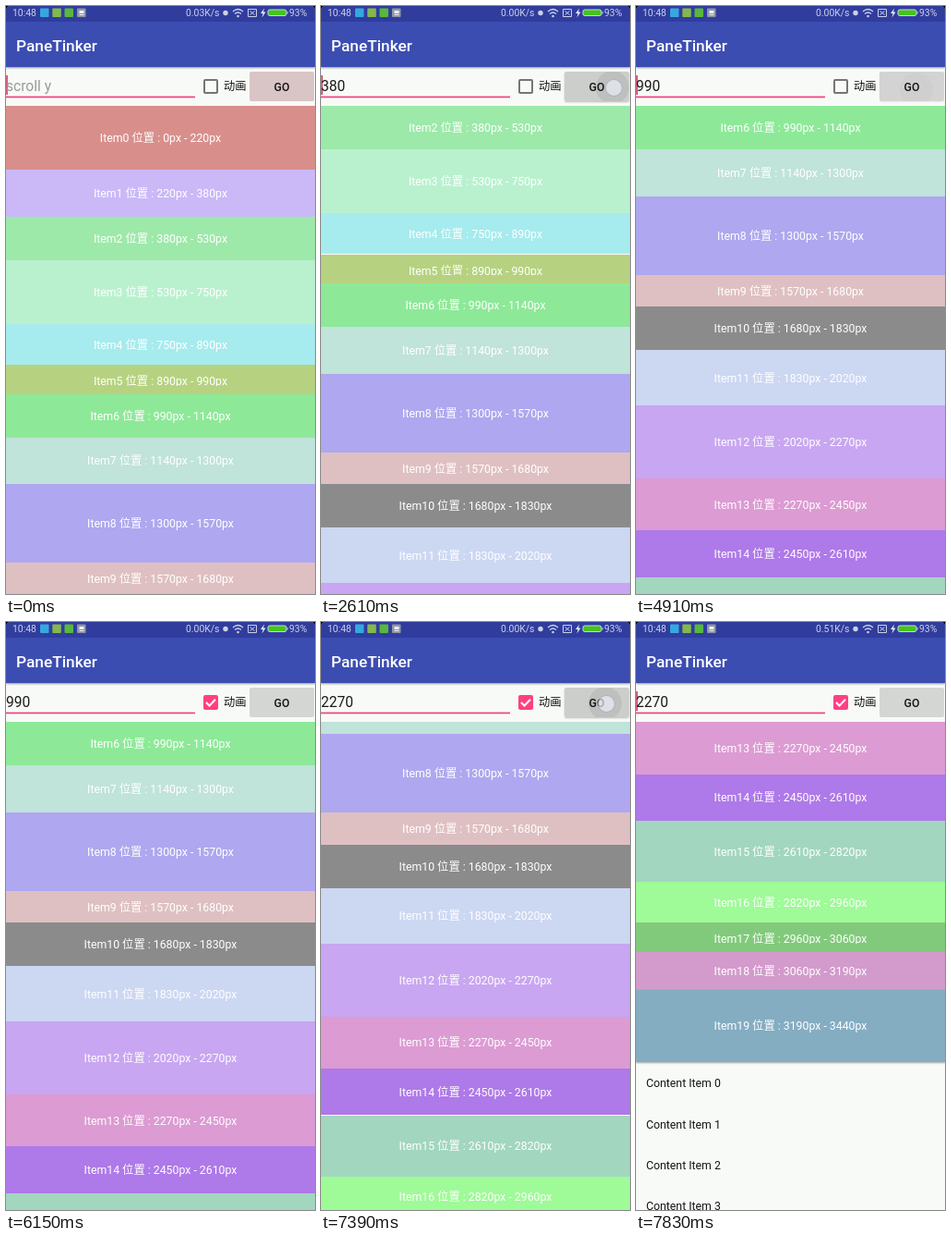
Write an HTML page that moves like this. It is 335 px wide and 636 px high and loops after 8 s.

```html
<!DOCTYPE html>
<html lang="zh">
<head>
<meta charset="utf-8">
<title>PaneTinker</title>
<style>
  html, body { margin: 0; width: 100%; height: 100%; overflow: hidden; background: #000; }
  body { position: relative; color: #151515;
    font: 12.3px/16px Roboto, "Noto Sans CJK SC", "Noto Sans CJK", sans-serif; }
  div, svg { position: absolute; }
  .t { white-space: pre; }
  #page { left: 0; top: 0; width: 335px; height: 636px; overflow: hidden;
    background: #f8faf7; border-radius: 5px 5px 0 0; }
  #list { left: 0; top: 108px; width: 335px; height: 528px; overflow: hidden; }
  #track { left: 0; top: 0; width: 335px; }
  .item { left: 0; width: 335px; }
  .label { left: 0; right: 0; top: 10px; bottom: 9px; overflow: hidden; color: #fff;
    display: flex; align-items: safe center; justify-content: center; }
  #bar { left: 0; top: 0; width: 335px; height: 66px; background: #3c4db2;
    box-shadow: 0 1px 2px rgba(0, 0, 0, .4); }
  #status { left: 0; top: 0; width: 335px; height: 17px; background: #303d9d;
    color: #ccd1ea; font-size: 10.4px; }
  #title { left: 11px; top: 31px; font: 500 17.3px/24px Roboto, sans-serif; color: #fff; }
  #field { left: 0; top: 77px; font-size: 15.6px; line-height: 20px; }
  #line { left: 0; top: 96px; }
  #caret { left: 0; top: 75px; width: 2px; height: 21px; background: #d8607f; }
  #button { left: 264px; top: 71px; width: 70px; height: 32px; border-radius: 2px; overflow: hidden; }
  #go { left: 0; width: 70px; top: 9px; text-align: center; font-weight: 500; }
  #lift { left: 264px; top: 71px; width: 70px; height: 32px; border-radius: 2px;
    box-shadow: 0 1px 2px rgba(0, 0, 0, .25); }
  #box { left: 214px; top: 79px; width: 12px; height: 12px; border: 2px solid #757575; border-radius: 2px; }
  .ripple { width: 36px; height: 36px; margin: -18px; border-radius: 50%; background: #000; }
  #dot { width: 17px; height: 17px; margin: -9.5px; border-radius: 50%;
    background: rgba(236, 239, 246, .68); border: 1px solid rgba(150, 156, 178, .65); }
</style>
</head>
<body>
<div id="page">
  <div id="list"><div id="track"></div></div>
  <div id="bar">
    <div id="status">
      <div class="t" style="left:7px;top:0">10:48</div>
      <svg width="335" height="17" style="left:0;top:0" fill="none" stroke="#ccd1ea">
        <g stroke="none">
          <rect x="37" y="2.5" width="9.5" height="9.5" rx="1" fill="#35a8e0"/>
          <rect x="50.3" y="2.5" width="9.5" height="9.5" rx="1" fill="#84b84c"/>
          <rect x="63.5" y="2.5" width="9.5" height="9.5" rx="1" fill="#58b83c"/>
          <rect x="77" y="2.5" width="9.5" height="9.5" rx="1" fill="#9097a6"/>
          <path d="M79.5 5h5v3h-5zM79.5 9h5v1h-5z" fill="#eef0f4"/>
          <circle cx="238" cy="7.5" r="2.7" fill="#ccd1ea"/>
          <circle cx="251.5" cy="11" r="1.3" fill="#ccd1ea"/>
          <path d="M280 2.500l-4 5.500h2.500l-1 4.500 4-6H279z" fill="#e4e7f5"/>
        </g>
        <path d="M246 6q5.500-5 11 0M248 8.500q3.500-3 7 0" stroke-width="1.3"/>
        <path d="M262.5 3.500h9v8h-9zM264.5 5.500l5 4M269.5 5.500l-5 4"/>
        <rect x="284" y="4" width="20" height="6.5" rx="2" fill="#43c51a"/>
        <path d="M305 6v2.500"/>
      </svg>
      <div class="t" id="speed" style="left:195px;top:0"></div>
      <div class="t" style="left:307px;top:0">93%</div>
    </div>
    <div class="t" id="title">PaneTinker</div>
  </div>
  <div id="caret"></div>
  <div class="t" id="field"></div>
  <svg id="line" width="205" height="5"><rect y="1.6" width="205" height="1.7" fill="#f0437f"/></svg>
  <div class="ripple" id="boxRipple" style="left:222px;top:87px"></div>
  <div id="box"></div>
  <svg id="tick" width="16" height="16" style="left:214px;top:79px" fill="none" stroke="#fff" stroke-width="2">
    <path d="M3 8l3.500 3.500L13 4.800"/>
  </svg>
  <div class="t" style="left:236px;top:79px">动画</div>
  <div id="lift"></div>
  <div id="button">
    <div class="t" id="go">GO</div>
    <div id="shade" style="left:0;top:0;width:70px;height:32px;background:#000"></div>
    <div class="ripple" id="goRipple"></div>
  </div>
  <div id="dot"></div>
</div>
<script>
const LOOP = 8000, SCALE = 0.3147;
const ui = {};
for (const el of document.querySelectorAll('[id]')) ui[el.id] = el;

const edges = [0, 220, 380, 530, 750, 890, 990, 1140, 1300, 1570, 1680, 1830,
  2020, 2270, 2450, 2610, 2820, 2960, 3060, 3190, 3440];
const colors = ['#d88f8c', '#cab8f7', '#9de9a9', '#b9f1cf', '#a6ebee', '#b6d280', '#8de998',
  '#c0e3da', '#afa7ef', '#dfc0c2', '#8b8b8b', '#ccd7f2', '#c8a6f1', '#dc9bd3', '#ae79e8',
  '#a2d6bf', '#9ffa98', '#82ca7b', '#d39acc', '#84adc2'];

function add(parent, cls, style, text = '') {
  const el = document.createElement('div');
  el.className = cls;
  el.style.cssText = style;
  el.textContent = text;
  return parent.appendChild(el);
}

colors.forEach((color, i) => {
  const top = edges[i], end = edges[i + 1];
  const last = i === colors.length - 1 ? ';box-shadow:0 1px 2px rgba(0,0,0,.35)' : '';
  const item = add(ui.track, 'item',
    `top:${top * SCALE}px;height:${(end - top) * SCALE}px;background:${color}${last}`);
  add(item, 'label', '', `Item${i} 位置 : ${top}px - ${end}px`);
});
for (let i = 0; i < 5; i++) {
  add(ui.track, 't', `left:11px;top:${3440 * SCALE + 15 + i * 44.4}px`, 'Content Item ' + i);
}

// [start time, value]
const texts = [[0, ''], [90, '380'], [3390, '990'], [6780, '2270']];
const speeds = [[0, '0.03K/s'], [90, '0.00K/s'], [7740, '0.51K/s']];
const carets = [[0, 1], [90, 0], [560, 1], [1060, 0], [1560, 1], [2060, 0], [2560, 1], [2950, 0],
  [3660, 1], [4140, 0], [4640, 1], [5000, 0], [5530, 1], [6000, 0], [6600, 1], [6780, 0], [7740, 1]];
const jumps = [[0, 0], [2530, 380], [4550, 990]];
const glide = { start: 7270, time: 400, from: 990, to: 2270 };
const taps = [
  { x: 317, y: 88, down: 2090, up: 2690 },
  { x: 305, y: 90, down: 4370, up: 4720 },
  { x: 225, y: 88, down: 5530, up: 5790, box: true },
  { x: 309, y: 88, down: 7130, up: 7480 }
];
const FADE = 260, CHECKED = 5700;

const clamp = v => Math.max(0, Math.min(1, v));
const at = (steps, t) => steps.reduce((v, s) => t >= s[0] ? s[1] : v, steps[0][1]);

// The button jumps at once; with the box ticked it glides.
function scrollAt(t) {
  if (t < glide.start) {
    return t >= jumps[2][0] ? jumps[2][1] : at(jumps, t);
  }
  const p = clamp((t - glide.start) / glide.time);
  return glide.from + (glide.to - glide.from) * (1 - Math.cos(Math.PI * p)) / 2;
}

function ripple(el, tap, t, alpha) {
  const grow = tap ? clamp((t - tap.down - 90) / 150) : 0;
  el.style.transform = `scale(${grow})`;
  el.style.opacity = alpha * 0.07;
}

function draw(t) {
  const text = at(texts, t);
  ui.field.textContent = text || 'scroll y';
  ui.field.style.color = text ? '#1c1c1c' : '#9a9a9a';
  ui.speed.textContent = at(speeds, t);
  ui.caret.style.opacity = at(carets, t);
  ui.track.style.top = -scrollAt(t) * SCALE + 'px';
  ui.button.style.background = t < 90 ? '#d9c4c6' : '#d4d6d4';

  const check = clamp((t - CHECKED) / 120);
  ui.box.style.background = check ? '#ff4081' : 'transparent';
  ui.box.style.borderColor = check ? '#ff4081' : '#757575';
  ui.tick.style.opacity = check;

  const tap = taps.find(p => t >= p.down && t < p.up + FADE);
  const alpha = tap ? 1 - clamp((t - tap.up) / FADE) : 0;
  const onBox = tap && tap.box;
  const press = onBox ? 0 : alpha;
  ui.shade.style.opacity = press * 0.04;
  ui.lift.style.opacity = press;
  ripple(ui.boxRipple, onBox ? tap : null, t, alpha);
  ripple(ui.goRipple, onBox ? null : tap, t, press);
  ui.dot.style.opacity = tap && t < tap.up ? 1 : 0;
  if (tap) {
    ui.dot.style.left = tap.x + 'px';
    ui.dot.style.top = tap.y + 'px';
    ui.goRipple.style.left = tap.x - 265 + 'px';
    ui.goRipple.style.top = tap.y - 71 + 'px';
  }
}

const begin = performance.now();
function tick() {
  draw((performance.now() - begin) % LOOP);
  requestAnimationFrame(tick);
}
tick();
</script>
</body>
</html>
```
